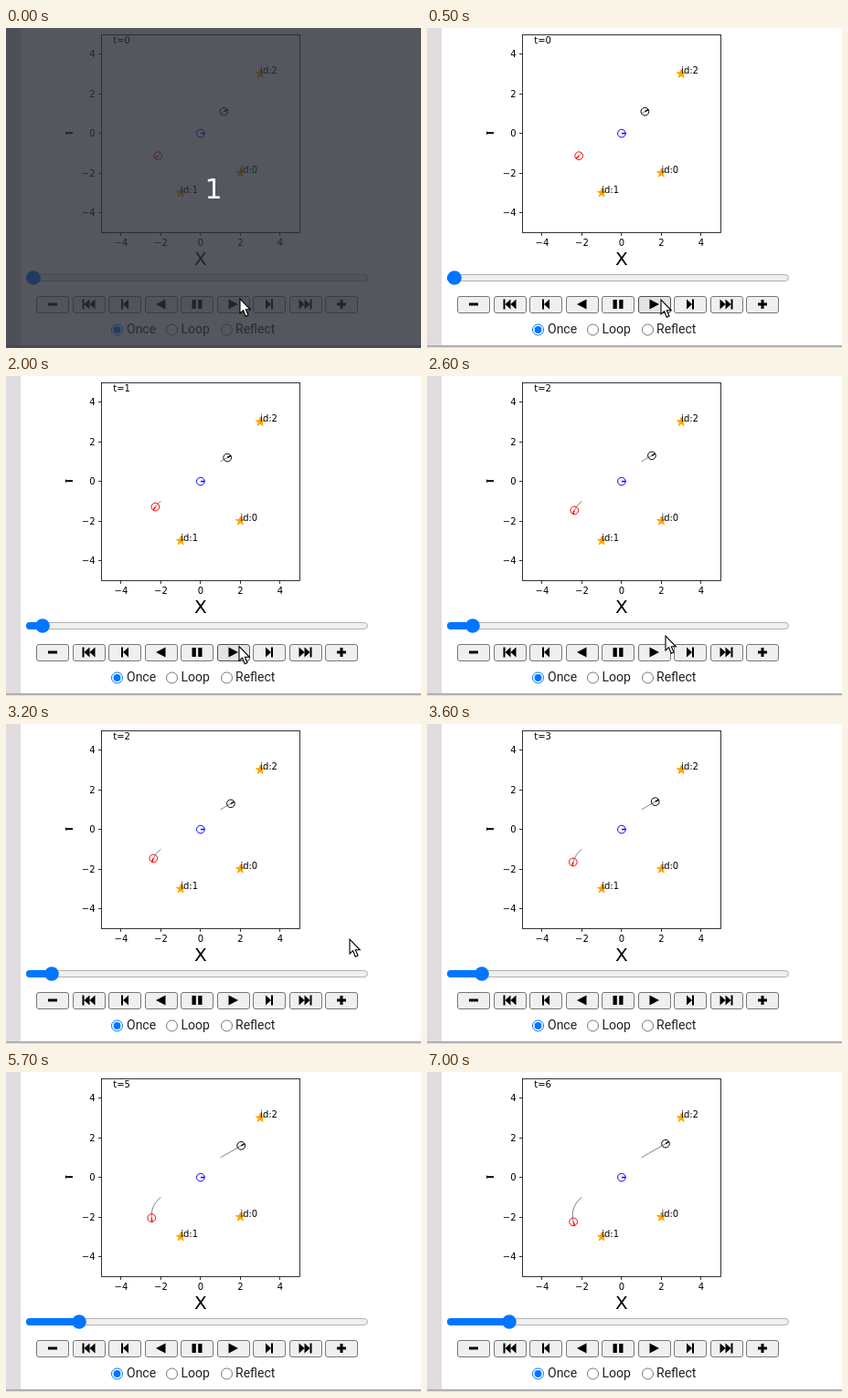
These frames come from a looping animation (454 by 351 pixels, 8 s). An HTML page:

```html
<!DOCTYPE html>
<html lang="en">
<head>
<meta charset="utf-8">
<title>Robot simulation player</title>
<style>
  html, body { margin: 0; width: 454px; height: 351px; overflow: hidden; background: #fff; }
  svg { display: block; }
  .plot text, .count { font-family: "DejaVu Sans", sans-serif; }
  .plot text { font-size: 10px; }
  .plot text.axis { font-size: 20px; }
  .radio text { font: 14px Roboto, sans-serif; fill: #212121; }
</style>
</head>
<body>
<svg id="stage" width="454" height="351" viewBox="0 0 454 351"></svg>
<script>
const stage = document.getElementById("stage");
const LOOP = 8000, UNIT = 21.74, CX = 212.9, CY = 115.6;
const px = x => CX + x * UNIT;
const py = y => CY - y * UNIT;
const rad = deg => deg * Math.PI / 180;

function add(parent, tag, attrs = {}, text) {
  const el = document.createElementNS("http://www.w3.org/2000/svg", tag);
  set(el, attrs);
  if (text !== undefined) el.textContent = text;
  parent.appendChild(el);
  return el;
}
function set(el, attrs) {
  for (const key in attrs) el.setAttribute(key, attrs[key]);
}

// Page
add(stage, "rect", { width: 454, height: 351, fill: "#fff" });
add(stage, "rect", { width: 16, height: 351, fill: "#e0dce0" });
add(stage, "rect", { y: 348, width: 454, height: 2, fill: "#b0aeb0" });
add(stage, "rect", { y: 350, width: 454, height: 1, fill: "#e4e2e4" });

// Axes
const plot = add(stage, "g", { class: "plot" });
add(plot, "rect", { x: 104.5, y: 7.5, width: 217, height: 217, fill: "none", stroke: "#000", "stroke-width": .8 });
for (let v = -4; v <= 4; v += 2) {
  const label = String(v).replace("-", "\u2212");
  const x = Math.floor(px(v)) + .5, y = Math.floor(py(v)) + .5;
  add(plot, "path", { d: `M${x} 224.5v3.5M104.5 ${y}h-3.5`, stroke: "#000", "stroke-width": .8 });
  add(plot, "text", { x: px(v), y: 239, "text-anchor": "middle" }, label);
  add(plot, "text", { x: 97.5, y: py(v) + 3.7, "text-anchor": "end" }, label);
}
add(plot, "text", { class: "axis", x: CX, y: 260, "text-anchor": "middle" }, "X");
const clip = add(add(stage, "defs"), "clipPath", { id: "crop" });
add(clip, "rect", { x: 65, y: 90, width: 20, height: 50 });
const cropped = add(plot, "g", { "clip-path": "url(#crop)" });
add(cropped, "text", { class: "axis", transform: `translate(73 ${CY - .5}) rotate(-90)`, "text-anchor": "middle" }, "Y");
const clock = add(plot, "text", { x: px(-4.4), y: 17 });

// Landmarks
[[2, -2], [-1, -3], [3, 3]].forEach(([x, y], id) => {
  const points = Array.from({ length: 10 }, (_, i) => {
    const r = i % 2 ? 1.91 : 5, a = i * Math.PI / 5;
    return [px(x) + r * Math.sin(a), py(y) - r * Math.cos(a)].map(n => n.toFixed(2));
  });
  add(plot, "polygon", { points: points.join(" "), fill: "orange", stroke: "orange", "stroke-linejoin": "bevel" });
  add(plot, "text", { x: px(x), y: py(y) }, "id:" + id);
});

// Robots: start pose, speed and turn rate (degrees) per step
const robots = [
  { x: 1, y: 1, heading: 30, speed: .2, turn: 0, color: "#000" },
  { x: -2, y: -1, heading: 216, speed: .2, turn: 10, color: "#f00" },
  { x: 0, y: 0, heading: 0, speed: 0, turn: 0, color: "#00f" }
];
for (const r of robots) {
  r.trail = add(plot, "polyline", { fill: "none", stroke: "#000", "stroke-width": .5 });
  r.nose = add(plot, "path", { stroke: r.color, "stroke-width": 1.5 });
  r.body = add(plot, "circle", { r: .2 * UNIT, fill: "none", stroke: r.color });
}
function poseAt(r, n) {
  const a = rad(r.heading), b = rad(r.heading + r.turn * n);
  if (!r.turn) return [r.x + r.speed * n * Math.cos(a), r.y + r.speed * n * Math.sin(a), a];
  const radius = r.speed / rad(r.turn);
  return [r.x + radius * (Math.sin(b) - Math.sin(a)), r.y + radius * (Math.cos(a) - Math.cos(b)), b];
}
function drawRobot(r, steps) {
  const path = [];
  for (let n = 0; n <= steps; n++) path.push(poseAt(r, n));
  const [x, y, a] = path[steps];
  set(r.trail, { points: path.map(p => px(p[0]) + "," + py(p[1])).join(" ") });
  set(r.nose, { d: `M${px(x)} ${py(y)}L${px(x + .2 * Math.cos(a))} ${py(y + .2 * Math.sin(a))}` });
  set(r.body, { cx: px(x), cy: py(y) });
}

// Slider
add(stage, "rect", { x: 22.5, y: 270.5, width: 373, height: 7, rx: 3.5, fill: "#efefef", stroke: "#b2b2b2" });
const filled = add(stage, "rect", { x: 22, y: 270, height: 8, rx: 4, fill: "#0075ff" });
const thumb = add(stage, "circle", { cy: 274, r: 7.8, fill: "#0075ff" });

// Buttons, icons centred on 0,0
const icons = [
  "M-5-1.5H5V1.5H-5z",
  "M-7-5.5h2V5.5h-2zM-5 0L1-5.5V5.5zM1 0L7-5.5V5.5z",
  "M-4-5.5h2V5.5h-2zM-2 0L4-5.5V5.5z",
  "M-5.5 0L5-5.5V5.5z",
  "M-5.5-5h4.3V5h-4.3zM1.2-5h4.3V5H1.2z",
  "M5.5 0L-5-5.5V5.5z",
  "M4-5.5h-2V5.5h2zM2 0L-4-5.5V5.5z",
  "M7-5.5h-2V5.5h2zM5 0L-1-5.5V5.5zM-1 0L-7-5.5V5.5z",
  "M-5-1.5h3.5V-5h3v3.5H5v3H1.5V5h-3V1.5H-5z"
];
const buttons = icons.map((d, i) => {
  const x = 51 + 39.5 * i;
  const face = add(stage, "rect", { x: Math.round(x - 18) + .5, y: 294.5, width: 35, height: 18, rx: 2.5 });
  add(stage, "path", { d, transform: `translate(${x} 303)` });
  return face;
});

// Loop mode
const radio = add(stage, "g", { class: "radio" });
["Once", "Loop", "Reflect"].forEach((name, i) => {
  const cx = 121.5 + 60 * i, on = i === 0;
  add(radio, "circle", { cx, cy: 331, r: 6, fill: "#fff", stroke: on ? "#0075ff" : "#767676" });
  if (on) add(radio, "circle", { cx, cy: 331, r: 3.9, fill: "#0075ff" });
  add(radio, "text", { x: [132, 191.5, 251][i], y: 335 }, name);
});

// Countdown veil and pointer
const veil = add(stage, "g");
add(veil, "rect", { width: 454, height: 351, fill: "rgb(42,46,54)", "fill-opacity": .8 });
add(veil, "text", { class: "count", x: 227, y: 187, "font-size": 30, fill: "#fff", "text-anchor": "middle" }, "1");
const pointer = add(stage, "path", {
  d: "M1 1V17L4.6 13.7 7.2 20.2 10 19 7.3 12.8H12.3z", fill: "#fff", stroke: "#000", "stroke-width": 1.1
});

const tickTimes = [2000, 2600, 3600, 4600, 5700, 7000];
const pointerStops = [
  [0, 255, 296], [500, 255, 297], [900, 254, 295], [1400, 254, 295.5], [2600, 260, 284],
  [2700, 287, 267], [2800, 314, 250], [3200, 375, 235], [3300, 436, 221], [3500]
];

function render(ms) {
  const t = tickTimes.filter(at => ms >= at).length;
  clock.textContent = "t=" + t;
  robots.forEach(r => drawRobot(r, t + 1));
  set(filled, { width: 8 + 10 * t });
  set(thumb, { cx: 30 + 10 * t });

  const counting = ms < 500;
  const hovered = !counting && ms < 2600 ? 5 : -1;
  buttons.forEach((b, i) => set(b, i === hovered
    ? { fill: "#e3e3e3", stroke: "#4f4f4f" }
    : { fill: "#efefef", stroke: "#767676" }));
  set(veil, { visibility: counting ? "visible" : "hidden" });

  const [, x, y] = pointerStops.filter(s => ms >= s[0]).pop();
  set(pointer, x === undefined
    ? { visibility: "hidden" }
    : { visibility: "visible", transform: `translate(${x} ${y})` });
}

const start = performance.now();
function loop() {
  render((performance.now() - start) % LOOP);
  requestAnimationFrame(loop);
}
render(0);
requestAnimationFrame(loop);
</script>
</body>
</html>
```
